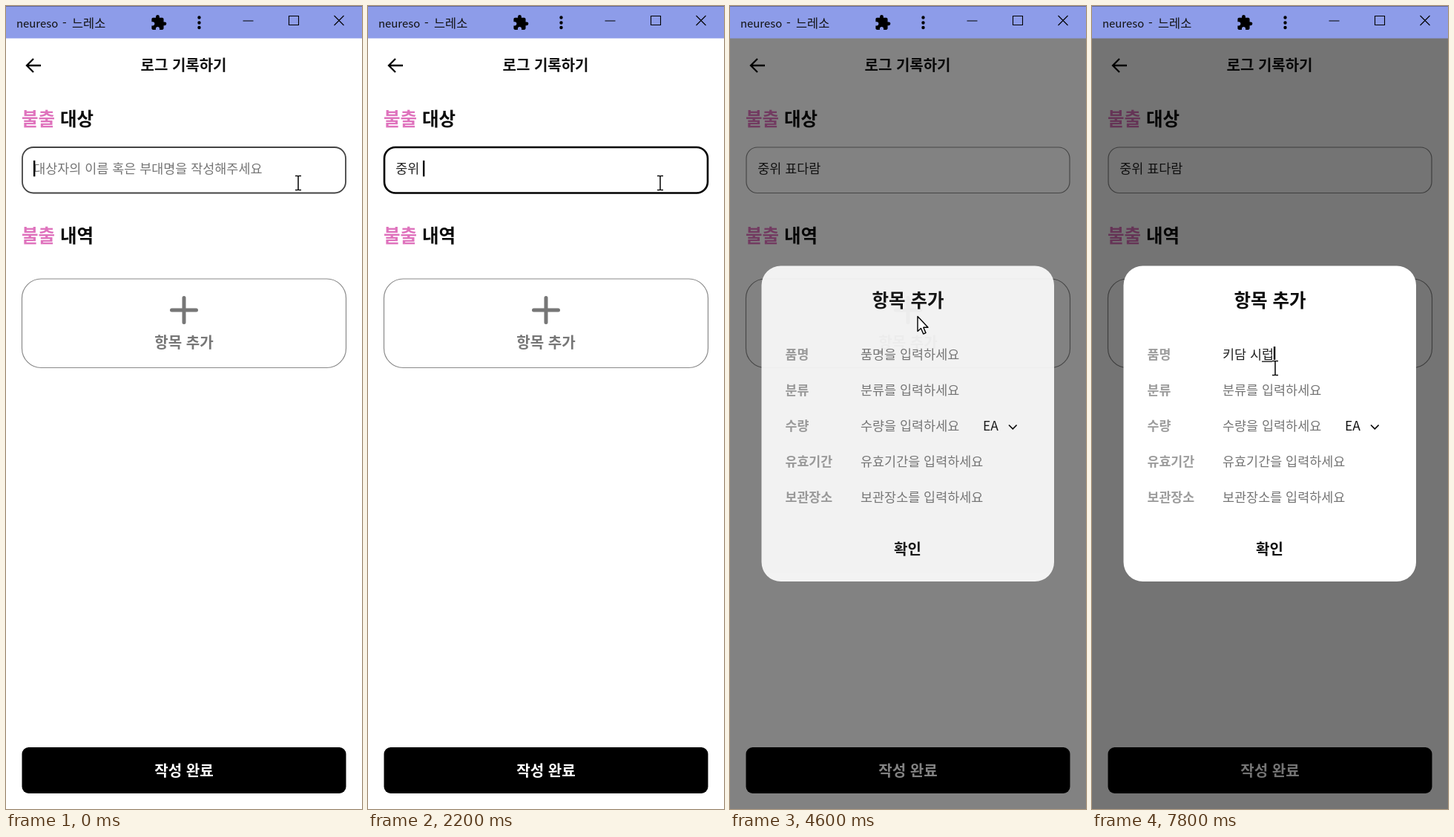
An HTML page for the animation above (8 s loop, 480 by 1080 pixels).

```html
<!DOCTYPE html>
<html lang="ko">
<head>
<meta charset="utf-8">
<style>
html, body { margin: 0; width: 100%; height: 100%; overflow: hidden; background: #fff; }
svg { display: block; width: 480px; height: 1080px; }
text { font: 300 17.45px "Noto Sans CJK KR", "Noto Sans CJK", "Noto Sans KR", sans-serif; white-space: pre; fill: #222; }
.bar { font-size: 16.4px; fill: #111; }
.head { font-size: 24.5px; font-weight: 700; fill: #0a0a0a; }
.mid { font-size: 20.1px; font-weight: 700; text-anchor: middle; }
.title { font-size: 20px; font-weight: 700; text-anchor: middle; fill: #111; }
.label { font-size: 17.3px; font-weight: 700; fill: #9c9c9c; }
.hint { fill: #757575; }
.pink { fill: #df73bd; }
.line { fill: none; stroke: #000; }
.cursor { fill: #fff; stroke: #000; stroke-width: 1.4; stroke-linejoin: round; }
</style>
</head>
<body>
<svg viewBox="0 0 480 1080">
  <rect width="480" height="1080" fill="#fff"/>

  <path class="line" stroke-width="2.3" d="M47 80H28.5M37 71l-9 9 9 9"/>
  <text class="title" x="239.5" y="87.2">로그 기록하기</text>

  <text class="head" x="21" y="161"><tspan class="pink">불출</tspan> 대상</text>
  <rect id="box" x="22" y="190" width="436" height="61.5" rx="15" fill="none"/>
  <g id="target"></g>

  <text class="head" x="21" y="318"><tspan class="pink">불출</tspan> 내역</text>
  <rect x="21.5" y="367" width="437" height="119.5" rx="26" fill="none" stroke="#8a8a8a" stroke-width="1.2"/>
  <path d="M223.5 409h33M240 392.5v33" stroke="#777" stroke-width="5" stroke-linecap="round"/>
  <text class="mid" x="240" y="459.5" style="fill:#777">항목 추가</text>

  <rect x="21.5" y="997" width="437" height="62" rx="9"/>
  <text class="mid" x="240" y="1035.5" style="fill:#fff">작성 완료</text>

  <rect id="shade" y="43" width="480" height="1037" fill-opacity=".545"/>
  <g id="modal">
    <rect x="42.5" y="349.5" width="394.5" height="424.5" rx="26" fill="#fff"/>
    <text class="head" x="240" y="404.5" text-anchor="middle">항목 추가</text>
    <g id="rows"></g>
    <g id="item"></g>
    <text x="341" y="571" style="fill:#111">EA</text>
    <path class="line" stroke-width="1.7" d="M376 563.5l5.3 5.3 5.3-5.3"/>
    <text class="title" x="239.5" y="737.5">확인</text>
  </g>

  <rect width="480" height="43.5" fill="#8d9ce9"/>
  <rect width="480" height="1" fill="#5f699f"/>
  <text class="bar" x="14" y="29" style="font-size:14.9px">neureso</text>
  <text class="bar" x="76" y="29">-</text>
  <text class="bar" x="89" y="29">느레소</text>
  <path transform="translate(194.5 11) scale(.95)" d="M20.5 11H19V7c0-1.1-.9-2-2-2h-4V3.5a2.5 2.5 0 0 0-5 0V5H4c-1.1 0-2 .9-2 2v3.8h1.5a2.7 2.7 0 0 1 0 5.4H2V20c0 1.1.9 2 2 2h3.8v-1.5a2.7 2.7 0 0 1 5.4 0V22H17c1.1 0 2-.9 2-2v-4h1.5a2.5 2.5 0 0 0 0-5z"/>
  <path d="M260.5 15.5h0M260.5 22.5h0M260.5 29h0" stroke="#000" stroke-width="4.4" stroke-linecap="round"/>
  <path class="line" stroke-width="1.1" d="M319.5 20h14M381.5 13.5h13v12h-13zM442.5 13l13 13M455.5 13l-13 13"/>

  <g id="cursors">
    <g data-kind="beam" fill="none">
      <path d="M-4-9.5H-1Q0-9.5 0-8.5V8.5Q0 9.5-1 9.5H-4M4-9.5H1Q0-9.5 0-8.5M0 8.5Q0 9.5 1 9.5H4" stroke="#fff" stroke-width="3.5"/>
      <path d="M-4-9.5H-1Q0-9.5 0-8.5V8.5Q0 9.5-1 9.5H-4M4-9.5H1Q0-9.5 0-8.5M0 8.5Q0 9.5 1 9.5H4" stroke="#111" stroke-width="1.6"/>
    </g>
    <path data-kind="arrow" class="cursor" d="M0 0V20l4.5-4 3.2 7.5 3.3-1.4-3.2-7.3h6.2z"/>
    <path data-kind="hand" class="cursor" d="M-2 18V2a2 2 0 0 1 4 0V11c0-2.5 4-2.3 4 0v1c.3-2 4-1.8 4 .5v1c.5-1.6 4-1.4 4 1V20c0 4-2 5-2 9H1c0-3-4-6-7-10-1.5-2 1-4.5 4-1z"/>
  </g>
</svg>
<script>
const STEP = 200, LOOP = 8000;
const $ = id => document.getElementById(id);

function add(parent, tag, attrs, content = '') {
  const el = document.createElementNS('http://www.w3.org/2000/svg', tag);
  for (const key in attrs) el.setAttribute(key, attrs[key]);
  el.textContent = content;
  parent.append(el);
  return el;
}

['품명', '분류', '수량', '유효기간', '보관장소'].forEach((name, i) => {
  const y = 475 + 48 * i;
  add($('rows'), 'text', { class: 'label', x: 74.5, y }, name);
  const particle = '을를을을를'[i];
  if (i) add($('rows'), 'text', { class: 'hint', x: 176, y }, name + particle + ' 입력하세요');
});

// Text field with a fading hint, a caret and an underline below the syllable being composed
function field(group, x, y, hintText) {
  const hint = add(group, 'text', { class: 'hint', x, y }, hintText);
  const text = add(group, 'text', { x, y });
  const under = add(group, 'rect', { y: y + 2.5, height: 1.4, fill: '#222' });
  const caret = add(group, 'rect', { y: y - 17, width: 2.4, height: 21.5 });
  return (value, hintAlpha, caretOn, composing) => {
    hint.setAttribute('opacity', hintAlpha);
    text.textContent = value;
    const end = value ? text.getComputedTextLength() : 0;
    const start = value.length > 1 ? text.getSubStringLength(0, value.length - 1) : 0;
    under.setAttribute('x', x + start);
    under.setAttribute('width', composing ? end - start : 0);
    caret.setAttribute('x', x + end - .2);
    caret.setAttribute('opacity', +caretOn);
  };
}
const drawTarget = field($('target'), 37.2, 224.8, '대상자의 이름 혹은 부대명을 작성해주세요');
const drawItem = field($('item'), 176, 475, '품명을 입력하세요');

// Each track holds [time, ...values]; a value lasts until the next entry
const targetTrack = [
  [0, '', 1, 1, 0], [600, '', 1, 0, 0], [800, 'w', .13, 1, 0], [1000, 'w', 0, 1, 0],
  [1200, '', 1, 1, 0], [1400, 'ㅈ', .13, 1, 1], [1600, '주', 0, 1, 1], [1800, '중', 0, 1, 1],
  [2000, '중위', 0, 1, 1], [2200, '중위 ', 0, 1, 0], [2400, '중위 ㅍ', 0, 1, 1],
  [2600, '중위 표', 0, 1, 1], [2800, '중위 표다', 0, 1, 1], [3000, '중위 표다라', 0, 1, 1],
  [3200, '중위 표다람', 0, 1, 1], [3600, '중위 표다람', 0, 0, 1], [4000, '중위 표다람', 0, 1, 1],
  [4400, '중위 표다람', 0, 0, 0]
];
const itemTrack = [
  [0, '', 1, 0, 0], [5200, '', 1, 1, 0], [5600, '', 1, 0, 0], [6200, '', 1, 1, 0],
  [6400, 'ㅋ', .13, 1, 1], [6600, 'ㅋ', 0, 1, 1], [6800, 'ㅋ', 0, 0, 1], [7000, '키', 0, 1, 1],
  [7200, '키담', 0, 1, 1], [7400, '키담 시', 0, 1, 1], [7600, '키담 시러', 0, 1, 1],
  [7800, '키담 시럽', 0, 1, 1]
];
const boxTrack = [[0, 1.8, '#444'], [200, 2.6, '#000'], [4400, 1.7, '#666'], [4600, 1.2, '#888']];
const modalTrack = [[0, 0], [4600, .9], [4800, 1]];
const cursorTrack = [
  [0, 'beam', 394, 238], [4000, 'arrow', 350, 300], [4200, 'hand', 276, 402],
  [4400, 'hand', 260.5, 418.5], [4600, 'arrow', 253, 417.5], [4800, 'arrow', 249, 455], [5000, 'beam', 247, 487]
];
const at = (track, t) => track.filter(entry => entry[0] <= t).pop().slice(1);

function draw(t) {
  drawTarget(...at(targetTrack, t));
  drawItem(...at(itemTrack, t));
  const [width, color] = at(boxTrack, t);
  $('box').setAttribute('stroke-width', width);
  $('box').setAttribute('stroke', color);
  for (const id of ['shade', 'modal']) $(id).setAttribute('opacity', at(modalTrack, t)[0]);
  const [kind, x, y] = at(cursorTrack, t);
  $('cursors').setAttribute('transform', `translate(${x} ${y})`);
  for (const c of $('cursors').children) c.style.display = c.dataset.kind === kind ? '' : 'none';
}

const begin = performance.now();
let last = -1;
function tick() {
  const t = Math.floor((performance.now() - begin) % LOOP / STEP) * STEP;
  if (t !== last) draw(last = t);
  requestAnimationFrame(tick);
}
tick();
</script>
</body>
</html>
```
